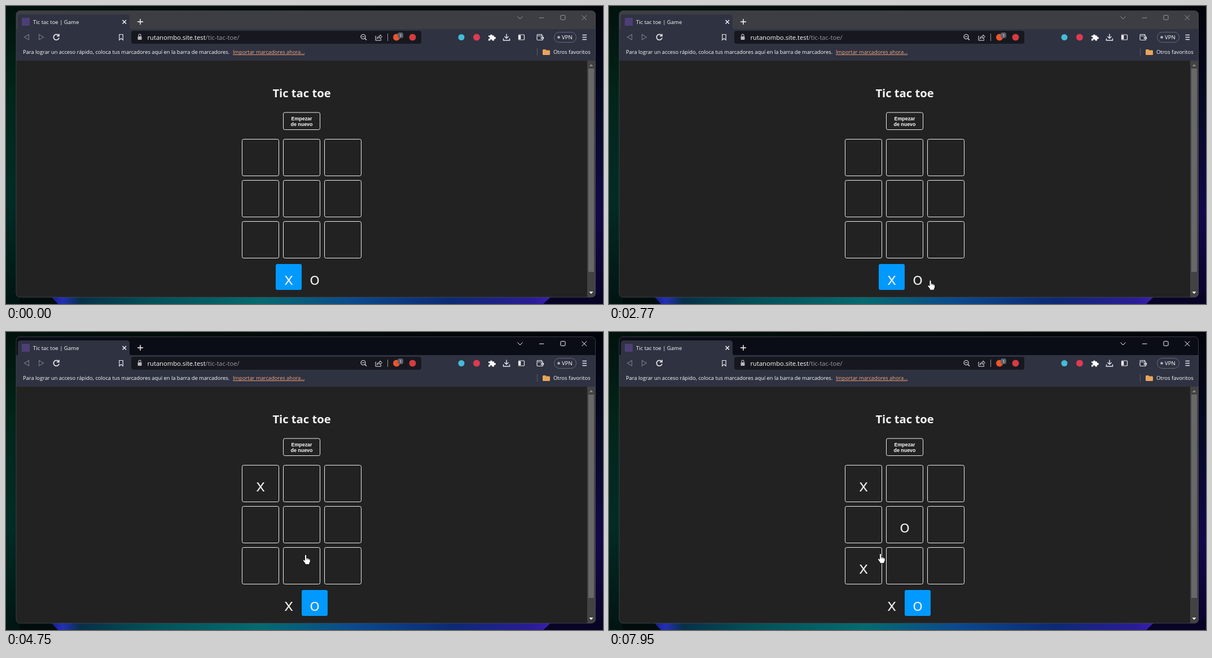
An HTML page that plays this animation: 1058 px wide and 529 px high, repeating every 8 s.

```html
<!DOCTYPE html>
<html lang="es">
<head>
<meta charset="utf-8">
<title>Tic tac toe</title>
<style>
  html, body { margin: 0; width: 100%; height: 100%; overflow: hidden; background: #010806; }
  svg { display: block; width: 100%; height: 100%; }
  text { font-family: "Open Sans", "Noto Sans", sans-serif; fill: #fff; }
  .ui { font-size: 9.3px; }
  .mark { font-size: 30px; text-anchor: middle; fill: #eee; }
  .restart { font: bold 8.89px "Liberation Sans", Arial, sans-serif; text-anchor: middle; }
  .line { fill: none; stroke: #e8e8ee; stroke-width: 1.2; }
  .box { fill: none; stroke: #eee; }
</style>
</head>
<body>
<svg id="stage" viewBox="0 0 1058 529" xmlns="http://www.w3.org/2000/svg">
  <defs>
    <linearGradient id="leftGlow" x2="0" y2="1">
      <stop offset="0" stop-color="#01120d"/><stop offset=".3" stop-color="#02251a"/>
      <stop offset=".65" stop-color="#032b25"/><stop offset="1" stop-color="#011512"/>
    </linearGradient>
    <linearGradient id="rightGlow" x2="0" y2="1">
      <stop offset="0" stop-color="#02040a"/><stop offset=".35" stop-color="#060a26"/>
      <stop offset=".7" stop-color="#12084a"/><stop offset="1" stop-color="#080428"/>
    </linearGradient>
    <linearGradient id="topGlow">
      <stop offset="0" stop-color="#01120d"/><stop offset=".5" stop-color="#020a09"/>
      <stop offset="1" stop-color="#02040a"/>
    </linearGradient>
    <linearGradient id="bottomGlow">
      <stop offset="0" stop-color="#101a86"/><stop offset=".025" stop-color="#2430b4"/>
      <stop offset=".06" stop-color="#073048"/><stop offset=".2" stop-color="#045057"/>
      <stop offset=".42" stop-color="#066a70"/><stop offset=".6" stop-color="#0b4a8c"/>
      <stop offset=".8" stop-color="#0d2a74"/><stop offset=".96" stop-color="#2a1c96"/>
      <stop offset="1" stop-color="#3c1fb0"/>
    </linearGradient>
    <clipPath id="frame"><rect x="18" y="8.5" width="1027" height="508.5" rx="7"/></clipPath>
  </defs>

  <!-- wallpaper -->
  <rect width="1058" height="529" fill="#010d0d"/>
  <rect width="1058" height="12" fill="url(#topGlow)"/>
  <rect width="24" height="529" fill="url(#leftGlow)"/>
  <rect x="1038" width="20" height="529" fill="url(#rightGlow)"/>
  <rect x="950" y="512" width="108" height="17" fill="#080425"/>
  <path d="M78 514H968L952 529H92Z" fill="url(#bottomGlow)"/>

  <!-- browser window -->
  <g clip-path="url(#frame)">
    <rect id="titleBar" x="18" y="8" width="1027" height="34"/>
    <path d="M18 41H20Q21 41 21 38V20Q21 15 26 15H214Q219 15 219 20V38Q219 41 222 41H1045V97H18Z" fill="#2f3241"/>
    <rect x="18" y="97" width="1027" height="421" fill="#222"/>
    <rect x="1030" y="97" width="15" height="421" fill="#424242"/>
    <rect x="1032" y="111" width="10" height="361" fill="#686868"/>
    <path d="M1033.5 107L1037 103L1040.500 107Z" fill="#868686"/>
    <path d="M1033.500 507L1037 511L1040.500 507Z" fill="#fff"/>
  </g>
  <rect x="18" y="8.500" width="1026.500" height="508.500" rx="7" fill="none" stroke="#4a4b50" stroke-opacity=".75"/>

  <!-- tab strip -->
  <rect x="28" y="21" width="14" height="14" fill="#4d3f76"/>
  <text x="48" y="31.500" font-size="9.500" font-weight="500">Tic tac toe | Game</text>
  <g class="line">
    <path d="M206.500 25L213 31.500M213 25L206.500 31.500M233 28H243M238 23V33" stroke="#fff" stroke-width="1.400"/>
    <path id="controls" d="M906.500 18.500L911 23L915.500 18.500M945 21H953.500M1020.500 16.500L1029 25M1029 16.500L1020.500 25M984.500 16.500H989.500Q991 16.500 991 18V23Q991 24.500 989.500 24.500H984.500Q983 24.500 983 23V18Q983 16.500 984.500 16.500Z" stroke-width="1"/>
  </g>

  <!-- toolbar -->
  <rect x="222" y="44" width="514" height="23" rx="4" fill="#17181f"/>
  <g class="line">
    <path d="M40.500 50.500V60L32.500 55.300Z M58.500 50.500V60L66.500 55.300Z" stroke="#747785"/>
    <path d="M93.300 52.600A4.900 4.900 0 1 0 94 56.500M94 49.500V53.300H90.200" stroke-width="1.700"/>
    <path d="M200.800 50.500H207.200V60.500L204 57.600L200.800 60.500Z"/>
    <path d="M235 54V52.200A2 2 0 0 1 239 52.200V54" stroke="#b8b9c0"/>
    <circle cx="633" cy="54.500" r="4"/>
    <path d="M636 57.500L639 60.500M631 54.500H635"/>
    <path d="M656 53.500H655V61H664.500V58.500M657.500 58Q658 53.500 663 53.500V51L666.500 54.500L663 58V55.800Q660 55.500 657.500 58Z" stroke-width="1"/>
    <path d="M676.500 49V62" stroke="#9698a4" stroke-width="1"/>
    <path d="M887 49.500V57M883.500 54L887 57.500L890.500 54M881.500 57.500V61H892.500V57.500" stroke-width="1.400"/>
    <rect x="908.500" y="51" width="10" height="9" rx="1"/>
    <path d="M910.500 52V59" stroke="#fff" stroke-width="3.500"/>
    <path d="M941 53.500V59Q941 60.500 942.500 60.500H951V53H942.500Q941 53 941 51.800Q941 50.500 942.500 50.500H949.500V53M952.500 55.500H948.500V58H952.500Z"/>
    <path d="M1021.500 51.500H1029M1021.500 55.500H1029M1021.500 59.500H1029" stroke-width="1.400"/>
    <rect x="971.500" y="46.500" width="39" height="18" rx="9" stroke="#666a7b" stroke-width="1"/>
  </g>
  <rect x="233.500" y="54" width="7" height="6" rx="1" fill="#b8b9c0"/>
  <text x="250.500" y="59.500" font-size="11.200">rutanombo.site.test<tspan fill="#9a9ba5">/tic-tac-toe/</tspan></text>
  <circle cx="692" cy="55.500" r="6" fill="#f0542b"/>
  <rect x="694" y="47" width="10" height="10" rx="3.500" fill="#5d606b"/>
  <text x="697" y="55" font-size="7.500">1</text>
  <circle cx="720.500" cy="55.500" r="6" fill="#d83a42"/>
  <circle cx="807" cy="55.500" r="5.500" fill="#43bcd9"/>
  <circle cx="834" cy="55.500" r="6" fill="#df3a52"/>
  <path d="M855 52.500H858A2 2 0 1 1 862 52.500H865V55A2 2 0 1 1 865 58.500V61.500H861.500A1.800 1.800 0 1 0 858 61.500H855V58A1.700 1.700 0 1 0 855 55Z" fill="#fff"/>
  <circle cx="979.500" cy="55.500" r="2.300" fill="#b6b8c2"/>
  <text x="985" y="59" font-size="9.600">VPN</text>

  <!-- bookmarks bar -->
  <text class="ui" x="30" y="85">Para lograr un acceso rápido, coloca tus marcadores aquí en la barra de marcadores.</text>
  <text class="ui" x="402" y="85" style="fill:#f8a77d">Importar marcadores ahora...</text>
  <path d="M402 86.500H529" stroke="#f8a77d" stroke-width=".9"/>
  <path d="M941.500 75V88" stroke="#5b5e6d"/>
  <path d="M951 78.500Q951 77 952.500 77H956L957.500 78.500H962.500Q964 78.500 964 80V86Q964 87 962.500 87H952.500Q951 87 951 86Z" fill="#e9a45b"/>
  <text x="970" y="85" font-size="9.450">Otros favoritos</text>

  <!-- game -->
  <text x="524" y="162" font-size="20.200" font-weight="700" text-anchor="middle" style="fill:#f4f4f4">Tic tac toe</text>
  <rect id="restart" class="box" x="491.500" y="189" width="65" height="30.500" rx="2.800"/>
  <g id="restartText">
    <text class="restart" x="524" y="202.500">Empezar</text>
    <text class="restart" x="524" y="212.500">de nuevo</text>
  </g>
  <g id="board"></g>
  <rect id="turn" y="458" width="46" height="46" rx="3" fill="#09f"/>
  <text class="mark" x="501" y="494.500">x</text>
  <text class="mark" x="547" y="494.500">o</text>

  <!-- pointer, with its hot spot at 0,0 -->
  <g id="pointer" stroke="#000" stroke-width=".9" stroke-linejoin="round">
    <g id="hand">
      <path d="M-1.600 1.300Q0 -.8 1.600 1.300V6.200Q3.300 5.300 4 6.900Q5.500 6.200 6.200 7.800Q8.200 7.300 8.200 9.400V12.800L6.800 15.300V17.700H-1V15.700L-4.600 11Q-5.200 8.900 -3.300 8.900L-1.600 10.500Z" fill="#fff"/>
      <path d="M1.600 6.200V9M4 7V9.300M6.200 8V9.800" fill="none" stroke-width=".7"/>
    </g>
    <path id="arrow" d="M0 0V15.500L3.600 12.200L6 17.700L8.300 16.700L6 11.300H10.800Z" fill="#fff"/>
  </g>
</svg>

<script>
const LOOP = 8000, STEP = 50;
const $ = id => document.getElementById(id);
const COLS = [418, 491, 564], ROWS = [236, 309, 382], SIZE = 66;

const MOVES = [
  { at: 3740, cell: 0, mark: 'x' },
  { at: 5520, cell: 4, mark: 'o' },
  { at: 7250, cell: 6, mark: 'x' }
];

// Pointer path: time, x, y
const PATH = [
  [1050, 984, 512], [1200, 862, 446], [1400, 676, 362], [1600, 568, 320],
  [1700, 545, 278], [1800, 531, 233], [1850, 529, 214], [1950, 526, 206],
  [2250, 526, 206], [2300, 508, 248], [2350, 475, 316], [2450, 486, 400],
  [2600, 530, 490], [2700, 560, 503], [2800, 579, 470], [2950, 548, 410],
  [3070, 504, 388], [3150, 474, 336], [3250, 449, 296], [3300, 448, 290],
  [3390, 448, 274], [3780, 448, 274], [3900, 490, 338], [4040, 532, 404],
  [4700, 532, 404], [4750, 531, 395], [4900, 508, 381], [5000, 494, 367],
  [5100, 504, 354], [5170, 515, 348], [5770, 515, 348], [5820, 515, 356],
  [6000, 506, 376], [6250, 478, 400], [6590, 458, 408], [7800, 458, 408],
  [7850, 462, 404], [7950, 481, 393], [8000, 481, 393]
];

const cells = ROWS.flatMap(y => COLS.map(x => ({ x, y, w: SIZE, h: SIZE })));
const hotAreas = [...cells, { x: 491, y: 189, w: 66, h: 31 }, { x: 478, y: 458, w: 92, h: 46 }];

function add(parent, tag, attrs) {
  const el = document.createElementNS('http://www.w3.org/2000/svg', tag);
  for (const name in attrs) el.setAttribute(name, attrs[name]);
  return parent.appendChild(el);
}

for (const { x, y } of cells) {
  add($('board'), 'rect', { class: 'box', x: x + .5, y: y + .5, width: SIZE - 1, height: SIZE - 1, rx: 2.8 });
}
for (const move of MOVES) {
  const { x, y } = cells[move.cell];
  move.el = add($('board'), 'text', { class: 'mark', x: x + SIZE / 2, y: y + 47 });
  move.el.textContent = move.mark;
}

const show = (el, on) => el.setAttribute('visibility', on ? 'visible' : 'hidden');
const smooth = v => { const k = Math.min(1, Math.max(0, v)); return k * k * (3 - 2 * k); };
const grey = v => { const c = Math.round(v); return `rgb(${c},${c},${c})`; };

function pointerAt(t) {
  const i = PATH.findIndex(p => p[0] > t);
  const [t0, x0, y0] = PATH[i - 1], [t1, x1, y1] = PATH[i];
  const k = (t - t0) / (t1 - t0);
  return [x0 + (x1 - x0) * k, y0 + (y1 - y0) * k];
}

function drawPointer(t) {
  const visible = t >= PATH[0][0];
  $('pointer').style.display = visible ? '' : 'none';
  if (!visible) return;
  const [x, y] = pointerAt(t);
  const hot = hotAreas.some(a => x >= a.x && x <= a.x + a.w && y >= a.y && y <= a.y + a.h);
  $('pointer').setAttribute('transform', `translate(${x.toFixed(1)} ${y.toFixed(1)})`);
  show($('hand'), hot);
  show($('arrow'), !hot);
}

function drawRestart(t) {
  const hover = smooth((t - 1820) / 250) * (1 - smooth((t - 2260) / 200));
  $('restart').style.fill = grey(34 + 204 * hover);
  for (const line of $('restartText').children) line.style.fill = grey(250 - 216 * hover);
}

function draw(t) {
  const focused = t >= MOVES[0].at;
  $('titleBar').setAttribute('fill', focused ? '#0b0d16' : '#3d3e44');
  $('controls').style.stroke = focused ? '#fff' : '#97989d';

  const played = MOVES.filter(m => t >= m.at).length;
  MOVES.forEach((m, i) => show(m.el, i < played));
  $('turn').setAttribute('x', played % 2 ? 524 : 478);

  const held = Math.floor(t / STEP) * STEP;
  drawRestart(held);
  drawPointer(held);
}

const start = performance.now();
function tick() {
  draw((performance.now() - start) % LOOP);
  requestAnimationFrame(tick);
}
tick();
</script>
</body>
</html>
```
